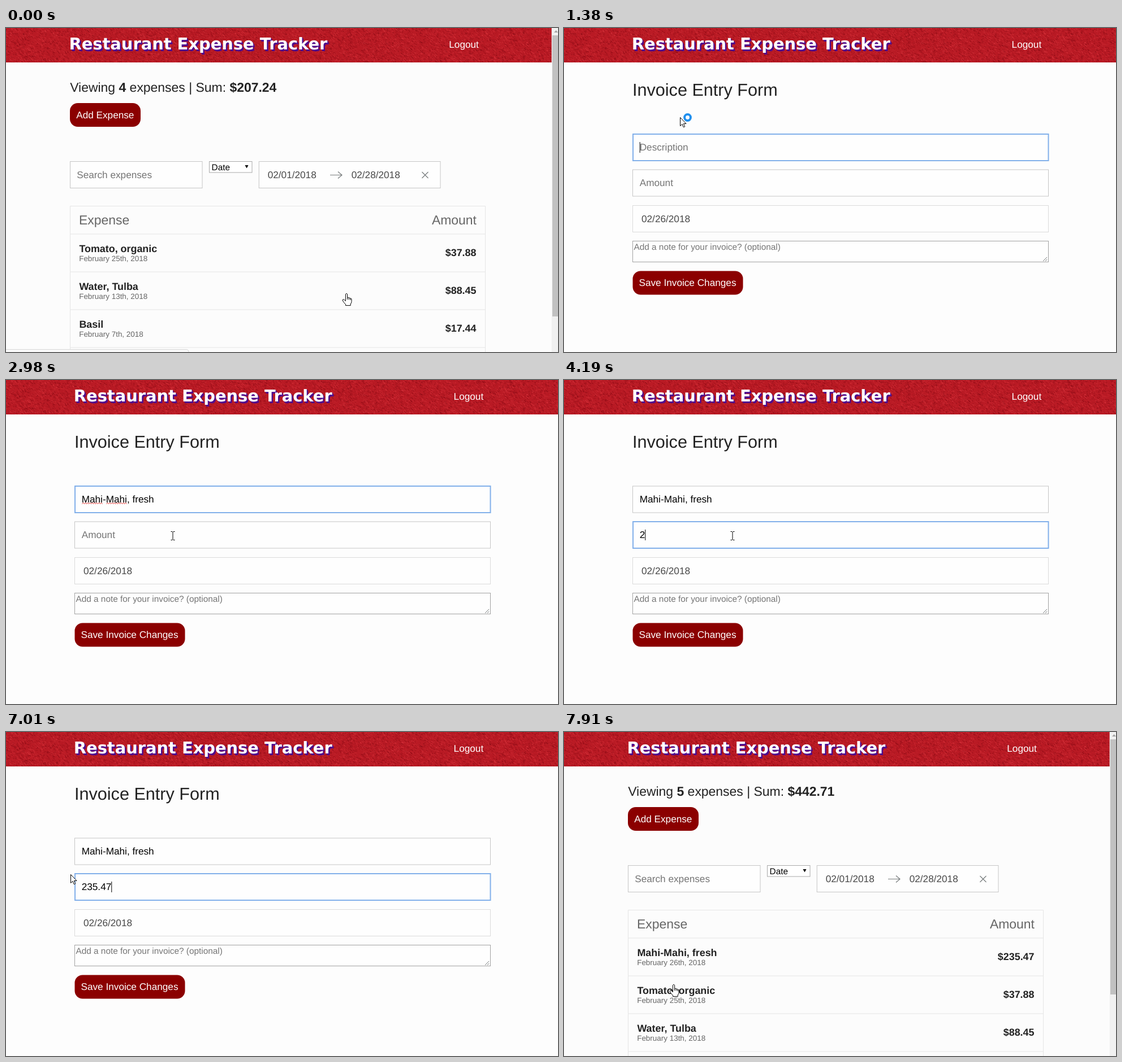
Recreate the animation shown at these times as an HTML page with a canvas. Size 976 by 574 pixels, loop 8000 ms.

```html
<!DOCTYPE html>
<html lang="en">
<head>
<meta charset="utf-8">
<title>Restaurant Expense Tracker</title>
<style>
html, body { margin: 0; width: 100%; height: 100%; overflow: hidden; background: #fcfcfc; }
canvas, svg { position: absolute; left: 0; top: 0; display: block; }
text { font-family: "Liberation Sans", Arial, sans-serif; font-size: 17.2px; fill: #222; white-space: pre; text-rendering: geometricPrecision; }
.title { font: bold 28.9px "DejaVu Sans", sans-serif; fill: #fff; }
.title.shade { fill: #4f0c8c; }
.big { font-size: 22.95px; }
.head { font-size: 22.95px; fill: #666; }
.h1 { font-size: 30.6px; }
.b { font-weight: bold; }
.name { font-size: 17.9px; font-weight: bold; }
.day { font-size: 13.44px; fill: #666; }
.mid { font-size: 15.35px; }
.hint { fill: #757575; }
.date { fill: #484848; }
.typed { fill: #000; }
.white { fill: #fff; }
.end { text-anchor: end; }
.box { fill: #fff; fill-opacity: .4; stroke: #c6c6c6; }
.line { stroke: #e5e5e5; fill: none; }
.btn { fill: #8b0000; }
.ring { fill: none; stroke: #82b0ea; stroke-width: 2; }
.icon { fill: none; stroke: #777b7c; stroke-width: 1.2; }
.squiggle { fill: none; stroke: #e0201c; stroke-width: 1; }
.caret { stroke: #000; }
.pointer { fill: #fff; stroke: #000; stroke-linejoin: round; }
</style>
</head>
<body>
<canvas id="cloth" width="976" height="61"></canvas>
<svg width="976" height="574" viewBox="0 0 976 574">
  <g id="banner">
    <text class="title shade" x="114" y="40.5">Restaurant Expense Tracker</text>
    <text class="title shade" x="112.8" y="39.2">Restaurant Expense Tracker</text>
    <text class="title" x="111.5" y="38">Restaurant Expense Tracker</text>
    <text class="white" x="783.3" y="34.5">Logout</text>
  </g>

  <g id="list">
    <text class="big" x="113.2" y="112.8">Viewing <tspan class="b" id="count"></tspan> expenses | Sum: <tspan class="b" id="sum"></tspan></text>
    <rect class="btn" x="113" y="133" width="125" height="42" rx="14"/>
    <text class="white" x="124.2" y="159.8">Add Expense</text>
    <rect class="box" x="113.5" y="236.5" width="233.5" height="47"/>
    <text class="hint" x="125.2" y="265.7">Search expenses</text>
    <rect x="359.5" y="236.5" width="75.5" height="19.5" fill="#fff" stroke="#a9a9a9"/>
    <text class="mid typed" x="363.6" y="251.5">Date</text>
    <path d="M422.5 243h6l-3 5.5z"/>
    <rect class="box" x="447.3" y="236.5" width="320.7" height="47"/>
    <text class="date" x="462.7" y="265.6">02/01/2018</text>
    <text class="date" x="610.7" y="265.6">02/28/2018</text>
    <path class="icon" d="M573 260.5h21m-7-6l7 6-7 6"/>
    <path class="icon" d="M735.5 255l11 11m0-11l-11 11"/>
    <g id="rows"></g>
    <path class="line" d="M113.5 574V315.5H847.5V574M113.5 365H847.5M113.5 432H847.5M113.5 499H847.5M113.5 566H847.5"/>
    <text class="head" x="129" y="348">Expense</text>
    <text class="head end" x="832" y="348">Amount</text>
    <rect x="964.7" width="11.3" height="574" fill="#f1f1f1"/>
    <rect id="thumb" x="966" y="13" width="10" fill="#c1c1c1"/>
    <path d="M969 8l3.5-4 3.5 4z" fill="#a3a3a3"/>
    <path id="status" d="M-1 569.5H319q4 0 4 5V576H-1z" fill="#fafafa" stroke="#d8d8d8"/>
  </g>

  <g id="form">
    <text class="h1" x="121" y="119.5">Invoice Entry Form</text>
    <rect class="box" x="121.5" y="188" width="735" height="47"/>
    <rect class="box" x="121.5" y="251" width="735" height="47"/>
    <rect class="box" x="121.5" y="314.5" width="735" height="47" style="stroke:#dbdbdb"/>
    <rect class="box" x="121.5" y="377.5" width="735" height="37" style="stroke:#a2a2a2"/>
    <path class="icon" style="stroke-width:1" d="M847 413l7-7m-3 7l3-3"/>
    <rect class="ring" id="focus" x="122" width="734.5" height="47"/>
    <text id="desc" x="133.7" y="217"></text>
    <g id="spell"></g>
    <text id="amount" x="133.7" y="280"></text>
    <text class="date" x="137" y="343.5">02/26/2018</text>
    <text class="mid hint" x="123.5" y="393">Add a note for your invoice? (optional)</text>
    <rect class="btn" x="121.5" y="430.5" width="195" height="42" rx="14"/>
    <rect class="ring" id="pressed" x="121.5" y="430.5" width="195.5" height="42" style="stroke-width:1.5"/>
    <text class="white" x="132.5" y="457">Save Invoice Changes</text>
    <path class="caret" id="caret" d="M.5 0v19"/>
  </g>

  <g id="cursor">
    <path class="pointer" id="hand" d="M-1.6 1.5Q0-1 1.6 1.5V7.6Q3.2 6.3 4.2 8.2 6 7.2 6.9 9.2 9 8.6 9 11V14.5Q9 17 7.2 19V21.6H-1.5V19.6Q-4.5 17-6.8 12.8-7.4 10.4-4.6 10.9L-1.6 13.6ZM1.6 7.6V11M4.2 8.2V11.4M6.9 9.2V12"/>
    <path class="pointer" id="arrow" d="M.5.5V15.5L4 12.3 6.3 17.8 8.7 16.8 6.4 11.5H11Z"/>
    <path id="ibeam" fill="none" stroke="#000" d="M-3.5-7.5H-1L0-6.5 1-7.5H3.5M0-6.5V6.5M-3.5 7.5H-1L0 6.5 1 7.5H3.5"/>
    <circle id="busy" cx="13.5" cy=".5" r="5.4" fill="#fff" stroke="#1f8fee" stroke-width="4"/>
  </g>
</svg>
<script>
const LOOP = 8000, OPEN = 1380, SAVED = 7730;
const $ = Object.fromEntries([...document.querySelectorAll('[id]')].map(e => [e.id, e]));
const show = (el, on) => { el.style.display = on ? '' : 'none'; };
const at = (el, x, y) => el.setAttribute('transform', `translate(${x} ${y})`);
const put = (el, s) => { if (el.textContent !== s) el.textContent = s; };

// Red twill: short slanted threads, dark and light
function weave() {
  const c = $.cloth.getContext('2d');
  let seed = 7;
  const rnd = () => (seed = seed * 16807 % 2147483647) / 2147483647;
  c.fillStyle = '#b91a24';
  c.fillRect(0, 0, 976, 61);
  for (let i = 0; i < 16000; i++) {
    const x = rnd() * 980 - 4, y = rnd() * 66 - 3, n = 1 + rnd() * 2.5;
    c.strokeStyle = rnd() < .5 ? `rgba(116,4,14,${rnd() * .55})` : `rgba(232,66,74,${rnd() * .5})`;
    c.beginPath();
    c.moveTo(x, y);
    c.lineTo(x + n, y + n * .6);
    c.stroke();
  }
}

const rows = [
  ['Mahi-Mahi, fresh', '26th', '$235.47'],
  ['Tomato, organic', '25th', '$37.88'],
  ['Water, Tulba', '13th', '$88.45'],
  ['Basil', '7th', '$17.44']
];
$.rows.innerHTML = rows.map(([name, day, cost], i) => `<g transform="translate(0 ${i * 67})">
  <text class="name" x="129.4" y="396.7">${name}</text>
  <text class="day" x="129.2" y="413">February ${day}, 2018</text>
  <text class="name end" x="831.5" y="404.2">${cost}</text></g>`).join('');

const zigzag = x => `<path class="squiggle" d="M${x} 219.5${'l2-2 2 2'.repeat(9)}"/>`;
$.spell.innerHTML = zigzag(134.5) + zigzag(177.5);

// Pointer strokes: first change, last change, number of steps, way points
const moves = [
  [90, 540, 6, [[602, 470], [540, 440], [370, 330], [250, 256]]],
  [810, 1290, 6, [[250, 256], [236, 226], [215, 180], [206, 159]]],
  [1380, 1380, 1, [[206, 159], [205, 158]]],
  [1550, 1550, 1, [[205, 158], [207, 165]]],
  [1640, 2000, 5, [[207, 165], [230, 172], [260, 188]]],
  [2180, 2980, 10, [[260, 188], [288, 222], [301, 260], [295, 276]]],
  [3250, 3250, 1, [[295, 276], [298, 276]]],
  [6740, 7460, 9, [[298, 276], [235, 222], [130, 238], [60, 300], [95, 400], [194, 447]]]
];

function along(pts, f) {
  const u = f * (pts.length - 1), i = Math.min(Math.floor(u), pts.length - 2), k = u - i;
  return pts[i].map((v, j) => v + (pts[i + 1][j] - v) * k);
}

function pointerAt(t) {
  let pos = moves[0][3][0];
  for (const [from, to, n, pts] of moves) {
    if (t < from) break;
    const gap = (to - from) / (n - 1) || 1;
    pos = along(pts, Math.min(n, Math.floor((t - from) / gap + .01) + 1) / n);
  }
  return pos;
}

// Hot areas: left, top, right, bottom, pointer shape
const areas = {
  list: [[113, 366, 847, 574, 'hand'], [113, 133, 238, 175, 'hand'], [113, 236, 347, 284, 'ibeam'], [447, 236, 768, 284, 'ibeam']],
  form: [[121, 187, 857, 236, 'ibeam'], [121, 250, 857, 299, 'ibeam'], [121, 314, 857, 362, 'ibeam'], [121, 377, 857, 415, 'ibeam'], [121, 430, 317, 473, 'hand']]
};
const shapeAt = (page, x, y) =>
  (areas[page].find(([l, t, r, b]) => x >= l && x <= r && y >= t && y <= b) || [])[4] || 'arrow';

const descText = 'Mahi-Mahi, fresh', amountText = '235.47';
const descKeys = [...descText].map((_, i) => i < 6 ? 1640 + i * 72 : 2180 + (i - 6) * 60);
const amountKeys = [4190, 4490, 4860, 5140, 5710, 5890];

function field(el, text, keys, hint, t) {
  const n = keys.filter(k => t >= k).length;
  put(el, n ? text.slice(0, n) : hint);
  el.setAttribute('class', n ? 'typed' : 'hint');
  return n;
}

function drawForm(t) {
  const first = t < 3070, pressed = t >= 7550;
  const n = field($.desc, descText, descKeys, 'Description', t);
  const m = field($.amount, amountText, amountKeys, 'Amount', t);
  show($.spell, first && n > 4);
  show($.spell.lastChild, n > 9);
  show($.focus, !pressed);
  $.focus.setAttribute('y', first ? 188 : 251);
  show($.pressed, pressed);

  const keys = first ? [OPEN, ...descKeys] : [3070, ...amountKeys];
  const last = keys.filter(k => k <= t).pop();
  const lit = first ? t < 2980 : Math.floor((t - last) / 545) % 2 === 0;
  show($.caret, lit && !pressed);
  const el = first ? $.desc : $.amount;
  at($.caret, 133.7 + ((first ? n : m) ? el.getComputedTextLength() : 0), first ? 202 : 265);
}

function drawList(t) {
  const added = t >= SAVED;
  put($.count, added ? '5' : '4');
  put($.sum, added ? '$442.71' : '$207.24');
  show($.rows.firstElementChild, added);
  at($.rows, 0, added ? 0 : -67);
  $.thumb.setAttribute('height', added ? 452 : 498);
  show($.status, t < 90);
}

function draw(t) {
  const page = t >= OPEN && t < SAVED ? 'form' : 'list';
  show($.list, page === 'list');
  show($.form, page === 'form');
  at($.banner, page === 'form' ? 8.3 : 0, 0);
  document.body.style.background = page === 'form' ? '#fdfdfd' : '#fcfcfc';
  (page === 'form' ? drawForm : drawList)(t);

  const [x, y] = pointerAt(t), shape = shapeAt(page, x, y);
  for (const s of ['hand', 'arrow', 'ibeam']) show($[s], s === shape);
  show($.busy, t >= OPEN && t < 1470);
  at($.cursor, Math.round(x), Math.round(y));
}

weave();
const start = performance.now();
(function tick() {
  draw((performance.now() - start) % LOOP);
  requestAnimationFrame(tick);
})();
</script>
</body>
</html>
```
